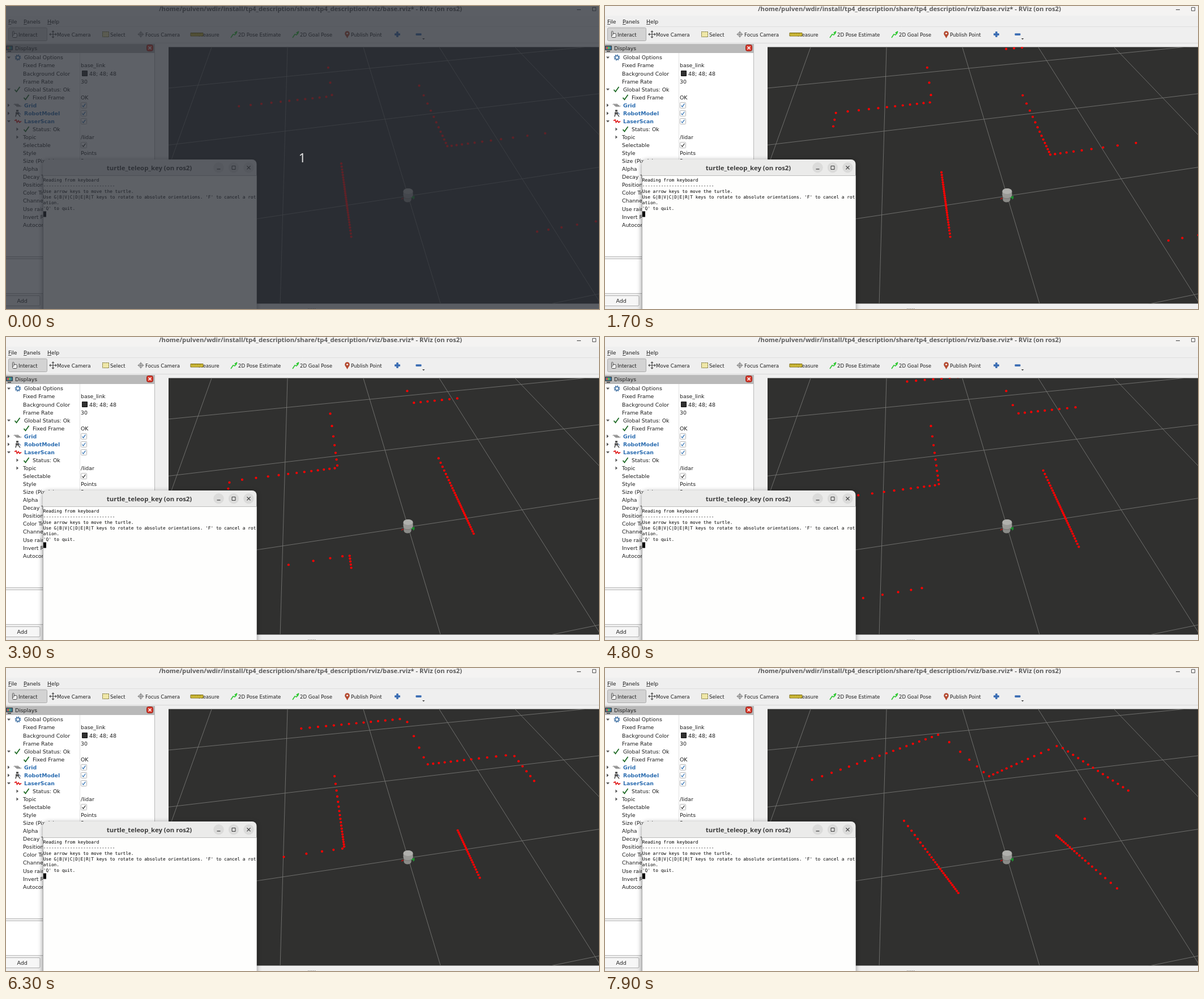
These frames come from a looping animation (1047x535 px, 8000 ms). An HTML page with a canvas:

```html
<!DOCTYPE html>
<html lang="en">
<head>
<meta charset="utf-8">
<title>Lidar view</title>
<style>
  html, body { margin: 0; width: 100%; height: 100%; overflow: hidden; background: #efefef; }
  canvas { display: block; width: 1047px; height: 535px; }
</style>
</head>
<body>
<canvas id="stage" width="1047" height="535"></canvas>
<script>
const ctx = document.getElementById('stage').getContext('2d');
const LOOP = 8000, STEP = 100;
const UI = '"DejaVu Sans", sans-serif';
const TITLE = '"Open Sans", sans-serif';
const MONO = '"DejaVu Sans Mono", monospace';
const RAD = Math.PI / 180;

// ---------- drawing helpers ----------
function box(x, y, w, h, fill, stroke, r = 0) {
  ctx.beginPath();
  ctx.roundRect(x, y, w, h, r);
  if (fill) { ctx.fillStyle = fill; ctx.fill(); }
  if (stroke) { ctx.strokeStyle = stroke; ctx.lineWidth = 1; ctx.stroke(); }
}

function path(color, width, ...p) {
  ctx.beginPath();
  for (let k = 0; k < p.length; k += 2) ctx.lineTo(p[k], p[k + 1]);
  ctx.strokeStyle = color;
  ctx.lineWidth = width;
  ctx.stroke();
}

function poly(color, ...p) {
  ctx.beginPath();
  for (let k = 0; k < p.length; k += 2) ctx.lineTo(p[k], p[k + 1]);
  ctx.fillStyle = color;
  ctx.fill();
}

function disc(x, y, rx, color, ry = rx) {
  ctx.beginPath();
  ctx.ellipse(x, y, rx, ry, 0, 0, 2 * Math.PI);
  ctx.fillStyle = color;
  ctx.fill();
}

function ring(x, y, r, color, width) {
  ctx.beginPath();
  ctx.arc(x, y, r, 0, 2 * Math.PI);
  ctx.strokeStyle = color;
  ctx.lineWidth = width;
  ctx.stroke();
}

function text(str, x, y, font, color = '#1c1c1c', align = 'left') {
  ctx.font = font;
  ctx.fillStyle = color;
  ctx.textAlign = align;
  ctx.fillText(str, x, y);
}

// ---------- ground plane: one grid cell is one unit ----------
const FAR = [508.6, -334], SIDE = [5150, -334], HOME = [710, 335.5];

function project(i, j) {
  const s = 0.254 * j, t = 0.0475 * i, w = 1 + s + t;
  return [0, 1].map(k => (HOME[k] + s * FAR[k] + t * SIDE[k]) / w);
}

// Maze walls as x1, y1, x2, y2, starting cell centred on 0, 0
const WALLS = [
  [-0.5, -0.5, -0.5, 0.5], [-1.5, 0.5, -0.5, 0.5], [-1.5, 0.5, -1.5, 1.5],
  [-1.5, 1.5, -0.5, 1.5], [-0.5, 1.5, -0.5, 2.5], [-1.5, 3.5, 0.5, 3.5],
  [0.5, 2.5, 0.5, 3.5], [0.5, 2.5, 1.5, 2.5], [1.5, 1.5, 1.5, 2.5],
  [0.5, 1.5, 1.5, 1.5], [0.5, 0.5, 0.5, 1.5225], [0.5, 0.5, 1.5, 0.5],
  [0.5, -0.5, 1.5, -0.5]
];
const RAYS = 100, FOV = 240;

// Distance driven: ramp up, cruise, brake before the turn
function travel(t) {
  const v = 0.26, start = 0.65, ramp = 1.28, brake = 6.9, stop = 0.742;
  const u = Math.max(0, t - start);
  if (u < ramp) return v * u * u / (2 * ramp);
  const cruise = v * (Math.min(t, brake) - start - ramp / 2);
  const b = Math.min(stop, Math.max(0, t - brake));
  return cruise + v * (b - b * b / (2 * stop));
}

// Heading to the right in degrees
const heading = t => 24.6 * Math.max(0, t - 6.9) ** 2;

function range(y0, dx, dy) {
  let best = Infinity;
  for (const [x1, y1, x2, y2] of WALLS) {
    let r, hit;
    if (x1 === x2) {
      r = x1 / dx;
      const y = y0 + r * dy;
      hit = y >= y1 && y <= y2;
    } else {
      r = (y1 - y0) / dy;
      const x = r * dx;
      hit = x >= x1 && x <= x2;
    }
    if (hit && r > 0 && r < best) best = r;
  }
  return best;
}

function drawScan(t) {
  const pos = travel(t), turn = heading(t);
  for (let k = 0; k < RAYS; k++) {
    const deg = -FOV / 2 + k * FOV / (RAYS - 1);
    const a = (deg + turn) * RAD;
    const r = range(pos, Math.sin(a), Math.cos(a));
    if (r === Infinity) continue;
    const [x, y] = project(r * Math.sin(deg * RAD), r * Math.cos(deg * RAD));
    disc(x, y, 2.1, '#ff0000');
  }
}

function drawView(t) {
  ctx.save();
  ctx.beginPath();
  ctx.rect(287, 72.5, 760, 453);
  ctx.clip();
  box(287, 72, 760, 454, '#30302f');
  for (let n = -2; n <= 2; n++) {
    path('#757573', 0.9, ...project(n, -2), ...project(n, 4));
    path('#757573', 0.9, ...project(-3, n), ...project(4, n));
  }
  drawRobot();
  drawScan(t);
  ctx.restore();
}

function drawRobot() {
  path('#b01818', 1.6, 698, 341, 702, 339);
  path('#18b030', 2, 716, 339, 721, 336);
  path('#18b030', 1.4, 719, 341, 721, 338);
  disc(709, 342, 6.5, '#8b8b88', 4.5);
  box(702.5, 334, 13, 8, '#8b8b88');
  disc(710, 334, 8.5, '#999996', 5.5);
  box(701.5, 327, 17, 7, '#999996');
  disc(710, 327, 8.5, '#b0b0ad', 5);
  path('#777774', 1, 704, 339, 707, 340, 712, 340, 715, 338);
}

// ---------- window chrome ----------
function drawFrame() {
  box(0, 0, 1047, 535, '#efefef');
  box(0, 0, 1047, 17, '#f4f3f2');
  text('/home/pulven/wdir/install/tp4_description/share/tp4_description/rviz/base.rviz* - RViz (on ros2)',
    537.5, 9, 'bold 11.2px ' + TITLE, '#5b5b5b', 'center');
  path('#555', 1.2, 1008, 6.5, 1015, 6.5);
  box(1035.5, 2.5, 6, 6, null, '#555');

  [['File', 4], ['Panels', 31], ['Help', 73]].forEach(([s, x]) => {
    text(s, x, 30.5, '9.3px ' + UI);
    const w = ctx.measureText(s[0]).width;
    path('#1c1c1c', 0.8, x, 32.5, x + w, 32.5);
  });
  path('#dedede', 1, 0, 36.5, 1047, 36.5);
  path('#d8d8d8', 1, 0, 65.5, 1047, 65.5);
  drawTools();
}

function arrow(x, y) {
  path('#2fc832', 1.6, x, y + 6, x + 4, y, x + 7, y + 1, x + 11, y - 5);
  poly('#2fc832', x + 11, y - 6, x + 6, y - 3, x + 10, y);
}

function crosshair(x, y, color) {
  path(color, 1.2, x - 5.5, y, x + 5.5, y);
  path(color, 1.2, x, y - 5.5, x, y + 5.5);
}

function drawTools() {
  box(4.5, 38.5, 68, 23, '#d3d3d3', '#ababab', 2);
  const labels = [['Interact', 22], ['Move Camera', 90], ['Select', 184], ['Focus Camera', 246],
    ['Measure', 340], ['2D Pose Estimate', 410], ['2D Goal Pose', 519], ['Publish Point', 609]];
  for (const [s, x] of labels) text(s, x, 53.6, '8.6px ' + UI);

  box(11.5, 48.5, 8, 7, '#f4f4f4', '#444', 2);
  box(11.5, 44.5, 2.5, 7, '#f4f4f4', '#444', 1);

  crosshair(83, 50, '#555');
  for (const [dx, dy] of [[1, 0], [-1, 0], [0, 1], [0, -1]])
    poly('#555', 83 + 7 * dx, 50 + 7 * dy, 83 + 4 * dx + 2.5 * dy, 50 + 4 * dy + 2.5 * dx,
      83 + 4 * dx - 2.5 * dy, 50 + 4 * dy - 2.5 * dx);

  ctx.setLineDash([2, 1]);
  box(170.5, 45.5, 11, 9, '#efe7a8', '#6b6420');
  ctx.setLineDash([]);
  ring(238, 50, 3.5, '#777', 1);
  crosshair(238, 50, '#777');

  box(326, 47.5, 22, 5.5, '#d8c33c', '#7a6a14');
  for (let x = 329; x < 347; x += 3) path('#7a6a14', 0.8, x, 48, x, 50.5);
  arrow(397, 50);
  arrow(506, 50);

  poly('#b54a30', 598.5, 50, 602.5, 57, 606.5, 50);
  disc(602.5, 48.5, 4.3, '#b54a30');
  disc(602.5, 48.5, 1.6, '#efefef');

  box(686, 48.3, 10, 3.6, '#3c6eb4', null, 1);
  box(689.2, 45, 3.6, 10, '#3c6eb4', null, 1);
  box(723.5, 48.3, 10, 3.6, '#3c6eb4', null, 1);
  poly('#444', 735, 57, 739.5, 57, 737.2, 59.5);
}

// ---------- displays panel ----------
const rowY = n => 91 + n * 14.06;

function check(x, y, color = '#1f6b26', s = 1) {
  path(color, 1.8 * s, x - 4.5 * s, y + 0.5 * s, x - 1.5 * s, y + 4 * s, x + 4.5 * s, y - 4.5 * s);
}

function tick(n, color) {
  box(132.5, rowY(n) - 5, 10, 10, '#fff', '#b4b4b4', 1);
  check(137.5, rowY(n), color, 0.65);
}

function expander(x, n, open) {
  const y = rowY(n);
  if (open) poly('#555', x - 3, y - 1.5, x + 3, y - 1.5, x, y + 2);
  else poly('#555', x - 1.5, y - 3, x + 2, y, x - 1.5, y + 3);
}

function drawPanel() {
  box(0, 67, 263, 15.5, '#b9b9b9');
  box(0.5, 70.5, 11, 7, '#3c7c9c', '#333');
  box(2, 72, 3, 4, '#d05050');
  box(5, 72, 3, 4, '#58b858');
  path('#333', 1.5, 3, 80, 9, 80);
  text('Displays', 16, 78, '9.3px ' + UI);
  box(248.5, 68.5, 11, 11, '#d83a2c', '#8f2018', 3);
  path('#fff', 1.4, 251.5, 71.5, 256.5, 76.5);
  path('#fff', 1.4, 256.5, 71.5, 251.5, 76.5);

  box(-1, 82.5, 263.5, 360, '#fff', '#b8b8b8');
  path('#e2e2e2', 1, 130.5, 83, 130.5, 442);

  const rows = [
    ['Global Options', 32], ['Fixed Frame', 30, 'base_link'], ['Background Color', 30],
    ['Frame Rate', 30, '30'], ['Global Status: Ok', 32], ['Fixed Frame', 47, 'OK'],
    ['Grid', 32], ['RobotModel', 32], ['LaserScan', 32], ['Status: Ok', 47],
    ['Topic', 30, '/lidar'], ['Selectable', 30], ['Style', 30, 'Points'],
    ['Size (Pixels)', 30, '3'], ['Alpha', 30], ['Decay Time', 30],
    ['Position Transformer', 30], ['Color Transformer', 30], ['Channel Name', 30],
    ['Use rainbow', 30], ['Invert Rainbow', 30], ['Autocompute Bounds', 30]
  ];
  rows.forEach(([label, x, value], n) => {
    const y = rowY(n) + 3.4, display = n > 5 && n < 9;
    text(label, x, y, (display ? 'bold ' : '') + '9.35px ' + UI, display ? '#2a6cb0' : '#1c1c1c');
    if (value) text(value, 132, y, '9.35px ' + UI);
  });

  box(134.5, 114.5, 9, 9, '#303030', '#111');
  text('48; 48; 48', 147, rowY(2) + 3.4, '9.35px ' + UI);
  for (const n of [6, 7, 8]) tick(n, '#2a6cb0');
  tick(11, '#222');
  expander(5, 0, true);
  expander(5, 4, true);
  expander(4.5, 6, false);
  expander(4.5, 7, false);
  expander(5, 8, true);
  expander(20, 9, false);
  expander(20, 10, false);
  check(20, rowY(4));
  check(36, rowY(5));
  check(36, rowY(9));

  ctx.setLineDash([2, 1.4]);
  ring(21, 91, 4.4, '#4a78a8', 2);
  ctx.setLineDash([]);
  ring(21, 91, 3, '#4a78a8', 1.4);

  const g = rowY(6);
  ctx.beginPath();
  for (const k of [-2.5, 0, 2.5]) {
    ctx.moveTo(16 + k, g + k * 0.6);
    ctx.lineTo(25 + k, g + k * 0.6);
    ctx.moveTo(18 + k, g - 3);
    ctx.lineTo(22.5 + k, g + 3);
  }
  ctx.strokeStyle = '#666';
  ctx.lineWidth = 0.8;
  ctx.stroke();

  const r = rowY(7);
  box(18, r - 6, 4, 3, '#444');
  box(17, r - 2, 6, 4, '#555');
  path('#444', 1.5, 18, r + 2, 17, r + 6);
  path('#444', 1.5, 22, r + 2, 25, r + 6);
  path('#5570a0', 1.2, 23, r - 1, 26, r + 2);

  const l = rowY(8);
  path('#e01c1c', 1.7, 15, l - 1, 18, l - 2.5, 19.5, l + 2, 22, l - 1, 24, l + 2, 27, l);

  box(-1, 446.5, 263.5, 61, '#fff', '#b8b8b8');
  box(-3, 511.5, 63, 18, '#f6f6f6', '#b0b0b0', 2);
  text('Add', 19.5, 524, '9.35px ' + UI);
  for (let x = 533; x < 547; x += 3) box(x, 534, 1.5, 1, '#999');
}

// ---------- terminal ----------
function drawTerminal() {
  ctx.save();
  ctx.shadowColor = 'rgba(0,0,0,.45)';
  ctx.shadowBlur = 9;
  ctx.shadowOffsetY = 2;
  box(65, 271, 377.5, 280, '#ebebea', null, [8, 8, 0, 0]);
  ctx.restore();
  text('turtle_teleop_key (on ros2)', 253, 289.5, 'bold 11.4px ' + TITLE, '#3d3d3d', 'center');

  for (const x of [375.5, 402, 428.5]) disc(x, 285.3, 9.2, '#dbdbda');
  path('#3a3a3a', 1.2, 372.5, 288, 378.5, 288);
  box(399, 282.5, 6, 6, null, '#3a3a3a');
  path('#3a3a3a', 1.2, 425.5, 282.3, 431.5, 288.3);
  path('#3a3a3a', 1.2, 431.5, 282.3, 425.5, 288.3);

  box(65, 299.5, 377.5, 236, '#fefefd');
  path('#bdbdbd', 1, 65, 299.5, 442.5, 299.5);
  path('#a8a8a8', 1, 65.5, 300, 65.5, 535);
  const lines = [
    'Reading from keyboard',
    '-'.repeat(27),
    'Use arrow keys to move the turtle.',
    "Use G|B|V|C|D|E|R|T keys to rotate to absolute orientations. 'F' to cancel a rot",
    'ation.',
    "'Q' to quit."
  ];
  lines.forEach((s, n) => text(s, 65.8, 309.8 + n * 10.13, '7.8px ' + MONO, '#000'));
  box(66, 362.5, 5, 10, '#000');
}

function drawCountdown() {
  box(0, 0, 1047, 535, 'rgba(40,44,52,.75)');
  text('1', 523, 275.5, '22px "Noto Sans", sans-serif', '#e4e4e4', 'center');
}

function render(ms) {
  drawFrame();
  drawPanel();
  drawView(ms / 1000);
  drawTerminal();
  if (ms < STEP) drawCountdown();
}

let began = null;
function tickFrame(now) {
  if (began === null) began = now;
  const ms = (now - began) % LOOP;
  render(Math.floor(ms / STEP) * STEP);
  requestAnimationFrame(tickFrame);
}
requestAnimationFrame(tickFrame);
</script>
</body>
</html>
```
